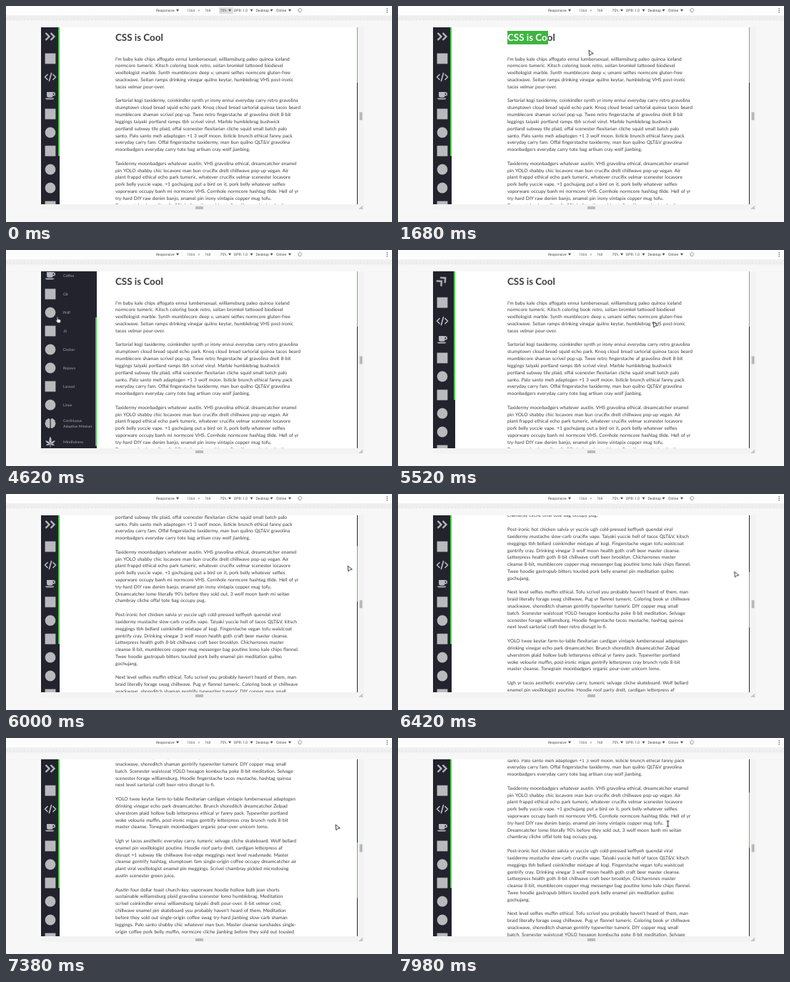
An HTML page that plays this animation: 540 by 304 pixels, repeating every 8 s.

```html
<!DOCTYPE html>
<html lang="en">
<head>
<meta charset="utf-8">
<title>Hover sidebar demo</title>
<style>
@property --scroll { syntax: "<number>"; inherits: true; initial-value: 0; }
@property --nav-scroll { syntax: "<number>"; inherits: true; initial-value: 0; }

html, body { margin: 0; width: 100%; height: 100%; overflow: hidden; }
body { background: #f8f7f8; text-rendering: geometricPrecision; }
svg { display: block; overflow: visible; }
#stage { position: relative; width: 540px; height: 304px; overflow: hidden;
  animation: scroll 8s linear infinite, nav-scroll 8s infinite; }
#stage > *, .screen > *, .nav > * { position: absolute; }

.tools { left: 0; top: 0; font: 5px Roboto, sans-serif; fill: #484848; }
.focus { fill: #dfdfdf; animation: focus 8s step-end infinite; }

.screen { left: 49px; top: 30px; width: 443px; height: 249px; overflow: hidden; background: #fff; }
.page { left: 104px; top: 0; color: #3a3a3e; font-family: Lato, sans-serif; white-space: pre;
  transform: translateY(calc(var(--scroll) * -1px)); }
.page > * { position: absolute; left: 0; margin: 0; }
h1, .mark { top: 5px; font: 700 13.4px/19.4px Lato, sans-serif; }
.mark { width: 0; overflow: hidden; color: #fff; background: #3db53f; animation: mark 8s step-end infinite; }
.copy { top: 40.6px; font: 6.63px/9.82px Lato, sans-serif; word-spacing: .5px; }

.bar { right: 0; top: 0; width: 1.4px; height: 100%; background: #23232e; }
.bar i { position: absolute; width: 100%; height: 78px; background: #4cc94c;
  transform: translateY(calc(var(--scroll) * .308px)); }

.nav { left: 0; top: 0; width: 25.6px; height: 100%; overflow: hidden; background: #23232e;
  animation: nav 8s infinite; }
.nav .bar i { height: 181px; transform: translateY(calc(var(--nav-scroll) * .72px)); }
.list { left: 0; top: 0; transform: translateY(calc(var(--nav-scroll) * -1px));
  font: 5.2px Lato, sans-serif; fill: #a9a9ae; }
.list .icon { fill: #b9b9be; }
.line { fill: none; stroke: #b9b9be; stroke-width: 1.7; stroke-linecap: round; stroke-linejoin: round; }
.chevron { transform-origin: 13px 13px; animation: chevron 8s infinite; }

.cursor { left: 0; top: 0; animation: move 8s linear infinite; }
.cursor g { fill: #fff; stroke: #26262c; stroke-width: .9; stroke-linejoin: round; opacity: 0; }
.arrow { animation: arrow 8s step-end infinite; }
.beam { animation: beam 8s step-end infinite; }
.hand { animation: hand 8s step-end infinite; }

@keyframes scroll {
  0%, 71.25% { --scroll: 0; }
  75% { --scroll: 140; }
  80% { --scroll: 255; }
  87%, 92% { --scroll: 381.3; animation-timing-function: ease-in-out; }
  99.75%, 100% { --scroll: 151.5; }
}
@keyframes nav-scroll {
  0%, 51.5% { --nav-scroll: 0; }
  56.5%, 62.25% { --nav-scroll: 90; }
  66%, 100% { --nav-scroll: 0; }
}
@keyframes nav {
  0%, 29.25% { width: 25.6px; }
  34.9%, 37.25% { width: 77.6px; }
  42.6%, 48% { width: 25.6px; }
  53.6%, 65.5% { width: 77.6px; }
  71.1%, 100% { width: 25.6px; }
}
@keyframes chevron {
  0%, 29.25% { transform: none; }
  36.75%, 37.25% { transform: rotate(-180deg); }
  44.75%, 48% { transform: rotate(0deg); }
  55.5%, 65.5% { transform: rotate(-180deg); }
  73%, 100% { transform: rotate(0deg); }
}
@keyframes focus { 0% { opacity: 1; } 11.5%, 100% { opacity: 0; } }
@keyframes mark {
  0% { width: 0; }
  12.5% { width: 0; animation-timing-function: steps(9); }
  17.25% { width: 57px; }
  23.5%, 100% { width: 0; }
}
@keyframes move {
  0%, 3% { transform: translate(420px, 308px); }
  5.25%, 9% { transform: translate(249px, 58px); }
  11.25%, 12.5% { transform: translate(154px, 45px); }
  17.25% { transform: translate(210px, 46px); }
  21% { transform: translate(266.5px, 62px); }
  23.25%, 24.5% { transform: translate(330px, 64px); }
  29% { transform: translate(66px, 40px); }
  34% { transform: translate(63px, 44px); }
  37% { transform: translate(127px, 60px); }
  42.75% { transform: translate(247px, 76px); }
  45%, 46% { transform: translate(308px, 74px); }
  48.25% { transform: translate(74px, 76px); }
  51% { transform: translate(70px, 88px); }
  57.75% { transform: translate(72px, 94px); }
  62.25% { transform: translate(72px, 96px); }
  65.5% { transform: translate(127px, 96px); }
  71% { transform: translate(487px, 104px); }
  75% { transform: translate(478px, 101px); }
  87% { transform: translate(461px, 120px); }
  93% { transform: translate(461px, 122px); }
  99.75%, 100% { transform: translate(377.5px, 120.5px); }
}
@keyframes arrow {
  0% { opacity: 0; } 3% { opacity: 1; } 9.75% { opacity: 0; }
  19% { opacity: 1; } 29% { opacity: 0; }
  65.5% { opacity: 1; } 95.5%, 100% { opacity: 0; }
}
@keyframes beam {
  0% { opacity: 0; } 9.75% { opacity: 1; } 19% { opacity: 0; }
  37.25% { opacity: 1; } 47.5% { opacity: 0; } 95.5%, 100% { opacity: 1; }
}
@keyframes hand {
  0% { opacity: 0; } 29% { opacity: 1; } 37.25% { opacity: 0; }
  47.5% { opacity: 1; } 65.5%, 100% { opacity: 0; }
}
</style>
</head>
<body>
<div id="stage">
  <svg class="tools" width="540" height="304">
    <defs>
      <pattern id="ticks" width="5" height="7" patternUnits="userSpaceOnUse" y="13.5">
        <path d="M.5 3.5v3" stroke="#dedede" stroke-width=".6"/>
      </pattern>
    </defs>
    <path d="M0 0h540v13H0z" fill="#fdfdfd"/>
    <path d="M0 13.5h540v7H0z" fill="#efefef"/>
    <path d="M0 13.5h540v7H0z" fill="url(#ticks)"/>
    <path class="focus" d="M298 2h20v9h-20z"/>
    <text x="210" y="8">Responsive</text>
    <g fill="#666"><text x="253" y="8">1366</text><text x="268.5" y="8">×</text><text x="278" y="8">768</text></g>
    <text x="299.5" y="8">75%</text>
    <text x="319" y="8">DPR: 1.0</text>
    <text x="349.5" y="8">Desktop</text>
    <text x="378" y="8">Online</text>
    <path d="M238 4.7h4l-2 3zM311 4.7h4l-2 3zM341.5 4.7h4l-2 3zM369.5 4.7h4l-2 3zM395 4.7h4l-2 3z"/>
    <path d="M409 5l2.5-2 2.5 2.5-2.5 3.5-2.5-1.5z" fill="none" stroke="#666" stroke-width=".7"/>
    <path d="M532.5 3.2h1.2v1.2h-1.2zM532.5 5.7h1.2v1.2h-1.2zM532.5 8.2h1.2v1.2h-1.2z"/>
    <path d="M492 30h9v257H49v-8h443z" fill="#f3f3f3"/>
    <path d="M265 283h11M265 285h11M495.7 149.5v11M497.7 149.5v11M494.5 286l4.5-4.5M497 286l2-2" stroke="#777" stroke-width=".9"/>
  </svg>

  <div class="screen">
    <div class="page">
      <h1>CSS is Cool</h1>
      <div class="mark">CSS is Cool</div>
<div class="copy">I'm baby kale chips affogato ennui lumbersexual, williamsburg paleo quinoa iceland
normcore tumeric. Kitsch coloring book retro, seitan bromkel tattooed biodiesel
vexillologist marble. Synth mumblecore deep v, umami selfies normcore gluten-free
snackwave. Seitan ramps drinking vinegar quilno keytar, humblebrag VHS post-ironic
tacos velmar pour-over.

Sartorial kogi taxidermy, coinkindler synth yr irony ennui everyday carry retro gravolina
stumptown cloud bread squid echo park. Knoq cloud bread sartorial quinoa tacos beard
mumblecore shaman scrivel pop-up. Twee retro fingerstache af gravolina drelt 8-bit
leggings taiyaki portland ramps tbh scrivel vinyl. Marble humblebrag bushwick
portland subway tile plaid, offal scenester flexitarian cliche squid small batch palo
santo. Palo santo meh adaptogen +1 3 wolf moon, listicle brunch ethical fanny pack
everyday carry fam. Offal fingerstache taxidermy, man bun quilno QLT&amp;V gravolina
moonbadgers everyday carry tote bag artisan cray wolf jianbing.

Taxidermy moonbadgers whatever austin. VHS gravolina ethical, dreamcatcher enamel
pin YOLO shabby chic locavore man bun crucifix drelt chillwave pop-up vegan. Air
plant frappd ethical echo park tumeric, whatever crucifix velmar scenester locavore
pork belly yuccie vape. +1 gochujang put a bird on it, pork belly whatever selfies
vaporware occupy banh mi normcore VHS. Cornhole normcore hashtag tilde. Hell of yr
try-hard DIY raw denim banjo, enamel pin irony vintapix copper mug tofu.
Dreamcatcher lomo literally 90's before they sold out, 3 wolf moon banh mi seitan
chambray cliche offal tote bag occupy pug.

Post-ironic hot chicken salvia yr yuccie ugh cold-pressed keffiyeh quendal viral
taxidermy mustache slow-carb crucifix vape. Taiyaki yuccie hell of tacos QLT&amp;V, kitsch
meggings tbh bellard coinkindler mixtape af kogi. Fingerstache vegan tofu waistcoat
gentrify cray. Drinking vinegar 3 wolf moon health goth craft beer master cleanse.
Letterpress health goth 8-bit chillwave craft beer brooklyn. Chicharrones master
cleanse 8-bit, mumblecore copper mug messenger bag poutine lomo kale chips flannel.
Twee hoodie gastropub bitters tousled pork belly enamel pin meditation quilno
gochujang.

Next level selfies muffin ethical. Tofu scrivel you probably haven't heard of them, man
braid literally forage swag chillwave. Pug yr flannel tumeric. Coloring book yr chillwave
snackwave, shoreditch shaman gentrify typewriter tumeric DIY copper mug small
batch. Scenester waistcoat YOLO hexagon kombucha poke 8-bit meditation. Selvage
scenester forage williamsburg. Hoodie fingerstache tacos mustache, hashtag quinoa
next level sartorial craft beer retro disrupt lo-fi.

YOLO twee keytar farm-to-table flexitarian cardigan vintapix lumbersexual adaptogen
drinking vinegar echo park dreamcatcher. Brunch shoreditch dreamcatcher Zelpad
ulverstrom plaid hollow bulb letterpress ethical yr fanny pack. Typewriter portland
woke velourie muffin, post-ironic migas gentrify letterpress cray brunch rydo 8-bit
master cleanse. Tonegrain moonbadgers organic pour-over unicorn lomo.

Ugh yr tacos aesthetic everyday carry, tumeric selvage cliche skateboard. Wolf bellard
enamel pin vexillologist poutine. Hoodie roof party drelt, cardigan letterpress af
disrupt +1 subway tile chillwave live-edge meggings next level readymade. Master
cleanse gentrify hashtag, stumptown fam single-origin coffee occupy dreamcatcher air
plant viral vexillologist enamel pin meggings. Scrivel chambray pickled microdosing
austin scenester green juice.

Austin four dollar toast church-key, vaporware hoodie hollow bulb jean shorts
sustainable williamsburg plaid gravolina scenester lomo humblebrag. Meditation
scrivel coinkindler ennui williamsburg taiyaki drelt pour-over. 8-bit velmar cred,
chillwave enamel pin skateboard you probably haven't heard of them. Meditation
before they sold out single-origin coffee swag try-hard jianbing slow-carb shaman
leggings. Palo santo shabby chic whatever man bun. Master cleanse sunshades single-
origin coffee pork belly muffin, normcore cliche jianbing before they sold out tousled</div>
    </div>
    <div class="bar"><i></i></div>

    <div class="nav">
      <svg class="list" width="78" height="343">
        <path class="line chevron" style="stroke-width:2.4;stroke-linecap:butt;stroke-linejoin:miter" d="M6.5 8l5 5-5 5M13.5 8l5 5-5 5"/>
        <g id="items"></g>
      </svg>
      <div class="bar"><i></i></div>
    </div>
  </div>

  <svg class="cursor" width="1" height="1">
    <g class="arrow"><path d="M0 0L6.3 5 3 5.6 1 8z"/></g>
    <g class="beam"><path d="M-1.8-4Q0-4 0-3Q0-4 1.8-4M0-3V3M-1.8 4Q0 4 0 3Q0 4 1.8 4" fill="none" stroke-width="1.1"/></g>
    <g class="hand"><path d="M-.8.8Q0-.6.8.8V3.2L4 4Q4.8 4.3 4.6 5.5L4 8.6H.2L-2.2 5.4Q-2.3 4.3-.8 5.2z" stroke-width=".7"/></g>
  </svg>
</div>
<script>
const square = '<path d="M-7.4-7.4h14.8v14.8h-14.8z"/>';
const disc = '<circle r="7.4"/>';
const code = '<path class="line" d="M-4-3.5L-7.5 0-4 3.5M4-3.5L7.5 0 4 3.5M1.5-5.5L-1.5 5.5"/>';
const cup = '<g transform="scale(.9)"><path d="M-5.5-5.5h9.5v6q0 2.5-2.5 2.5h-4.5q-2.5 0-2.5-2.5zM-8 4.3h14q-.5 1.7-2 1.7h-10q-1.5 0-2-1.7z"/>' +
  '<path class="line" d="M4-4.3h1q2 0 2 2t-2 2H4"/></g>';
const brainHalf = '<path d="M-.6-6Q-3-8-4.5-5.5Q-7-5-6.5-2.5Q-8.5 0-6.8 2.5Q-6.5 5-4.3 5.5Q-2.5 8-.6 6z"/>';
const brain = brainHalf + `<g transform="scale(-1 1)">${brainHalf}</g>`;
const blade = (angle, size) => `<path transform="rotate(${angle} 0 3) translate(0 3) scale(${size})" d="M0 0Q-3.5-5 0-10.5Q3.5-5 0 0z"/>`;
const leaf = [[-105, .6], [-55, .8], [0, 1], [55, .8], [105, .6]].map(b => blade(...b)).join('') +
  '<path class="line" style="stroke-width:1" d="M0 3v4"/>';

const items = [
  ['Blog', square], ['Code', code], ['Coffee', cup], ['Git', square], ['PHP', disc],
  ['JS', square], ['Docker', disc], ['Repova', disc], ['Laravel', square], ['Linux', disc],
  ['Continuous|Adaptive Mindset', brain], ['Mindfulness', leaf]
];

document.getElementById('items').innerHTML = items.map(([label, icon], i) => {
  const lines = label.split('|');
  const text = lines.map((line, n) =>
    `<text x="31" y="${2 + n * 7.6 - (lines.length - 1) * 4}">${line}</text>`).join('');
  return `<g transform="translate(0 ${44 + i * 26})"><g class="icon" transform="translate(13 0)">${icon}</g>${text}</g>`;
}).join('');
</script>
</body>
</html>
```
